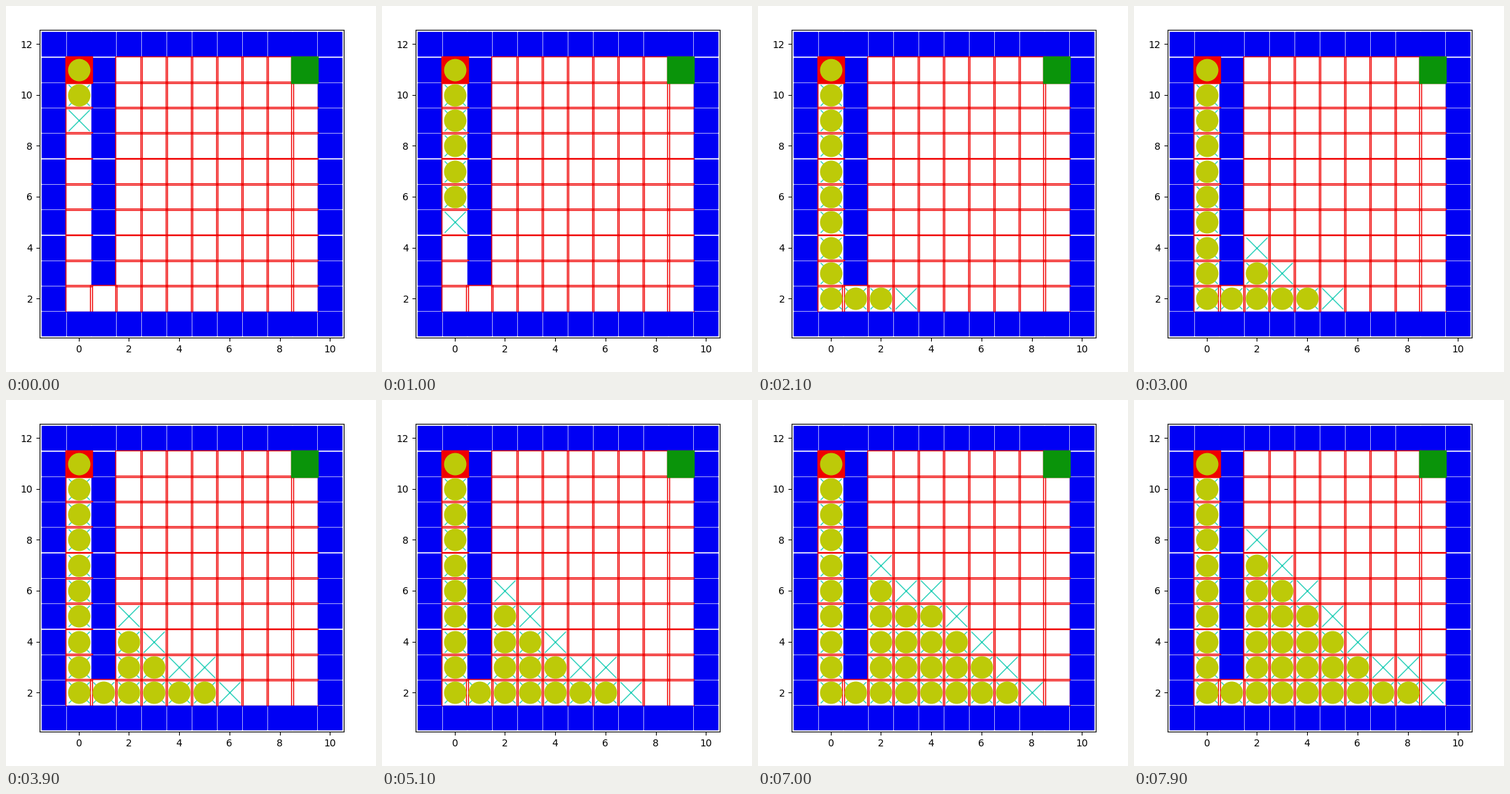
Recreate the animation shown at these times as a matplotlib script. Size 528 by 522 pixels, loop 8000 ms.

```python
import numpy as np
import matplotlib.pyplot as plt
from matplotlib.animation import FuncAnimation

W, H, DPI = 528, 522, 100
FRAMES, STEP = 80, 100
START, GOAL = (0, 11), (9, 11)
BLUE, RED, GREEN = "#0000f4", "#f00000", "#0a940a"
TEAL, OLIVE = "#26cfb8", "#bdca08"

# Cells run row by row from the top left.
cells = [(x, y) for y in range(12, 0, -1) for x in range(-1, 11)]
walls = {(x, y) for x, y in cells
         if x in (-1, 10) or y in (1, 12) or (x == 1 and y > 2)}


def search():
    """Breadth-first search: (found cell, cells expanded so far) per step."""
    queue, seen, steps = [START], {START}, []
    for count, (x, y) in enumerate(queue, 1):
        for cell in ((x + 1, y), (x, y + 1), (x - 1, y), (x, y - 1)):
            if cell not in walls and cell not in seen:
                seen.add(cell)
                queue.append(cell)
                steps.append((cell, count))
        if GOAL in seen:
            break
    return queue, steps


queue, steps = search()

plt.rcParams["font.family"] = "DejaVu Sans"
fig = plt.figure(figsize=(W / DPI, H / DPI), dpi=DPI, facecolor="white")
ax = fig.add_axes([48 / W, 48.7 / H, 434 / W, 439 / H])


def square(cell, size, edge, face):
    ax.plot(*cell, "s", ms=size, mec=edge, mfc=face)


# Neighbouring outlines overlap, so the drawing order matters.
for cell in cells:
    if cell in walls:
        square(cell, 25, BLUE, BLUE)
    else:
        square(cell, 27, RED, "none")
square(START, 27, RED, RED)
square(GOAL, 27, GREEN, GREEN)
crosses, = ax.plot([], [], "x", ms=22, color=TEAL)
discs, = ax.plot([], [], "o", ms=22, color=OLIVE)
ax.set_xlim(-1.55, 10.55)
ax.set_ylim(0.45, 12.55)
ax.set_xticks(range(0, 11, 2))
ax.set_yticks(range(2, 13, 2))

# The search slows and speeds up a little as it runs.
TIMES = [0, 10, 21, 39, 51, 61, 79]
FOUND = [2, 6, 12, 22, 27, 32, 40]


def update(frame):
    n = int(np.interp(frame, TIMES, FOUND) + 0.4)
    expanded = steps[n - 1][1]
    crosses.set_data(*zip(*(cell for cell, _ in steps[:n])))
    discs.set_data(*zip(*queue[:expanded]))
    return crosses, discs


anim = FuncAnimation(fig, update, frames=FRAMES, interval=STEP,
                     repeat=True, repeat_delay=0)
plt.show()
```
